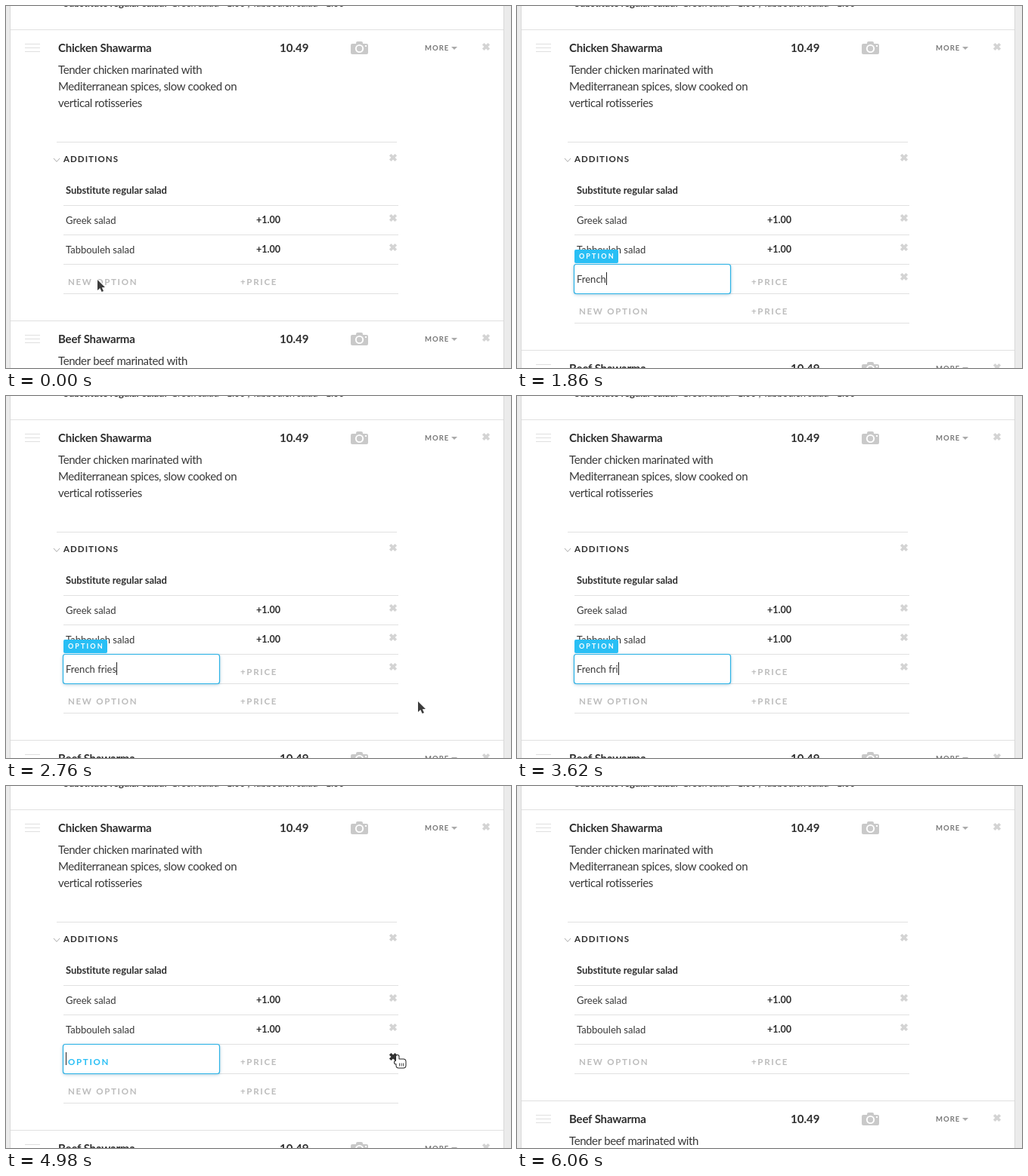
Write an HTML page with a canvas that moves like this. It is 668 px wide and 480 px high and loops after 6080 ms.

```html
<!DOCTYPE html>
<html lang="en">
<head>
<meta charset="utf-8">
<title>Menu editor</title>
<style>
  html, body { margin: 0; width: 100%; height: 100%; overflow: hidden; background: #ebebeb; }
  canvas { display: block; }
</style>
</head>
<body>
<canvas id="stage" width="668" height="480"></canvas>
<script>
const ctx = document.getElementById('stage').getContext('2d');
const LOOP = 6080, ROW = 39;
const INK = '#2e2e2e', SOFT_INK = '#383838', RULE = '#e1e1e1', PALE = '#d4d4d4', HINT = '#bcbcbc', BLUE = '#29bff5';
const WORD = 'French fries';
const ADDED = 520, TYPING = 940, CLEARED = 4440, BLURRED = 5100, REMOVED = 5320;

const progress = (t, a, b) => Math.min(1, Math.max(0, (t - a) / (b - a)));
const ease = p => p * p * (3 - 2 * p);
const mix = (a, b, p) => a + (b - a) * p;
const within = (t, a, b) => t >= a && t < b;

// Letters struck so far in an evenly paced run of key presses
function burst(t, first, last, steps, letters = steps) {
  if (t < first) return 0;
  const struck = 1 + Math.floor((steps - 1) * progress(t, first, last));
  return Math.round(letters * struck / steps);
}

function typedLetters(t) {
  const added = burst(t, TYPING, 1340, 4) + burst(t, 1680, 2240, 7) + burst(t, 2400, 2401, 1);
  const erased = burst(t, 3180, 3181, 1) + burst(t, 3560, 3820, 4, 5) + burst(t, 3960, CLEARED, 4, 6);
  return added - erased;
}

function text(str, x, y, size, { bold = false, gap = 0, color = bold ? INK : SOFT_INK } = {}) {
  ctx.font = `${bold ? 'bold ' : ''}${size}px Lato, sans-serif`;
  ctx.letterSpacing = gap + 'px';
  ctx.fillStyle = color;
  ctx.fillText(str, x, y);
  return ctx.measureText(str).width;
}

const hint = (str, x, y, color = HINT) => text(str, x, y, 11.5, { bold: true, gap: 1.7, color });

function rect(x, y, w, h, color) {
  ctx.fillStyle = color;
  ctx.fillRect(x, y, w, h);
}

const optionRule = y => rect(76, y, 443, 1, RULE);

function paint(fill, stroke, width) {
  ctx.lineJoin = 'round';
  if (stroke) { ctx.strokeStyle = stroke; ctx.lineWidth = width; ctx.stroke(); }
  if (fill) { ctx.fillStyle = fill; ctx.fill(); }
}

function shape(points, fill, stroke, width) {
  ctx.beginPath();
  points.forEach(([x, y]) => ctx.lineTo(x, y));
  ctx.closePath();
  paint(fill, stroke, width);
}

function box(x, y, w, h, r, fill) {
  ctx.beginPath();
  ctx.roundRect(x, y, w, h, r);
  paint(fill);
}

function disc(x, y, r, color) {
  ctx.beginPath();
  ctx.arc(x, y, r, 0, 7);
  paint(color);
}

function cross(x, y, color = PALE) {
  ctx.beginPath();
  for (const s of [-1, 1]) {
    ctx.moveTo(x - 3.8, y - 3.8 * s);
    ctx.lineTo(x + 3.8, y + 3.8 * s);
  }
  paint(null, color, 3.7);
}

function camera(x, y) {
  const gray = '#c9c9c9';
  box(x, y + 3, 23, 14, 2, gray);
  box(x + 7, y, 9, 6, 2, gray);
  disc(x + 11.5, y + 9.5, 5.6, '#fff');
  disc(x + 11.5, y + 9.5, 3.7, gray);
  rect(x + 19, y + 5, 2, 2, '#fff');
}

function dish(name, lines, y) {
  rect(6, y, 652, 1, RULE);
  for (let i = 0; i < 3; i++) rect(25, y + 19 + i * 5, 20, 1, '#dfdfdf');
  text(name, 69, y + 30, 15, { bold: true, gap: -.2 });
  text('10.49', 362, y + 30, 15, { bold: true });
  lines.forEach((line, i) => text(line, 69, y + 59 + i * 22, 15, { gap: -.4 }));
  camera(456, y + 16);
  text('MORE', 554, y + 28, 9.5, { bold: true, gap: 1, color: '#777' });
  shape([[589, y + 23], [597, y + 23], [593, y + 27]], '#aaa');
  cross(635, y + 23);
}

function option(name, y) {
  text(name, 79, y + 25, 13);
  text('+1.00', 331, y + 24, 12.5, { bold: true });
  cross(512, y + 17);
  optionRule(y + ROW);
}

function blankOption(y) {
  hint('NEW OPTION', 82, y + 28);
  hint('+PRICE', 310, y + 28);
  optionRule(y + ROW);
}

function field(t, typed) {
  const focus = ease(progress(t, 60, 280));
  if (!focus) return;
  ctx.globalAlpha = focus;
  ctx.save();
  ctx.shadowColor = 'rgba(40, 120, 160, .45)';
  ctx.shadowBlur = 4;
  ctx.shadowOffsetY = 1;
  box(75.5, 342.5, 207, 39, 3, '#fff');
  ctx.restore();
  paint(null, '#2bb2e6', 1.2);

  let caret = 79;
  if (typed) {
    caret += text(WORD.slice(0, typed), 79, 367, 13);
    const lift = ease(progress(t, TYPING - 20, TYPING + 60));
    const y = mix(344, 323, lift);
    ctx.globalAlpha = lift;
    box(76, y, 58, 18, 2, BLUE);
    text('OPTION', 82, y + 12, 9, { bold: true, gap: 2.1, color: '#fff' });
    ctx.globalAlpha = 1;
  } else {
    hint('OPTION', 82, 370, BLUE);
  }
  rect(Math.round(caret), 353, 1, 17, '#222');
  ctx.globalAlpha = 1;
}

function activeRow(t) {
  ctx.globalAlpha = 1 - progress(t, REMOVED, REMOVED + 240);
  hint('+PRICE', 310, 370);
  if (t < REMOVED) optionRule(381);
  if (t >= ADDED) cross(512, 359, within(t, 4900, REMOVED) ? '#333' : PALE);
  if (t >= BLURRED) {
    hint('OPTION', 82, 370);
  } else {
    hint('NEW OPTION', 82, 370);
    field(t, typedLetters(t));
  }
  ctx.globalAlpha = 1;
}

function arrow() {
  shape([[0, 0], [0, 14], [3.3, 11], [5.6, 16], [8, 15], [5.8, 10.2], [10, 10]], '#3c3c3c', '#fff', 2);
}

function beam() {
  for (const [color, width] of [['#fff', 3], ['#222', 1.2]]) {
    ctx.beginPath();
    for (const s of [-1, 1]) {
      ctx.moveTo(-3.5, 7.5 * s);
      ctx.quadraticCurveTo(0, 7.5 * s, 0, 5 * s);
      ctx.quadraticCurveTo(0, 7.5 * s, 3.5, 7.5 * s);
    }
    ctx.moveTo(0, -6);
    ctx.lineTo(0, 6);
    paint(null, color, width);
  }
}

function hand() {
  ctx.beginPath();
  ctx.roundRect(-2, 0, 3.5, 12, 1.7);
  ctx.roundRect(-1.5, 5.5, 12, 11, 3);
  ctx.roundRect(-4, 7.5, 6, 4, 2);
  paint('#fff', '#222', 2);
  for (let x = 2; x < 8; x += 2.5) rect(x, 10.5, 1, 4, '#444');
}

function pointer(t) {
  const typingHides = within(t, TYPING, 2400) || within(t, 3240, CLEARED + 40);
  if (typingHides || t >= 6060) return;
  let x = 121, y = 363;
  const glide = (start, end, toX, toY) => {
    const p = ease(progress(t, start, end));
    x = mix(x, toX, p);
    y = mix(y, toY, p);
  };
  glide(60, 380, 147, 361);
  glide(2400, 2740, 545, 405);
  glide(2840, 2940, 532, 403);
  glide(4480, 4960, 518, 357);
  glide(5920, 6060, 680, 428);

  ctx.save();
  ctx.translate(x, y);
  if (within(t, 100, CLEARED) && x < 283) beam();
  else if (within(t, 4900, REMOVED)) hand();
  else arrow();
  ctx.restore();
}

function draw(t) {
  const extra = t < ADDED ? 0 : ROW * (1 - ease(progress(t, REMOVED, REMOVED + 300)));

  rect(0, 0, 668, 480, '#ebebeb');
  rect(5, 0, 654, 480, '#d9d9d9');
  rect(6, 0, 652, 480, '#fff');

  text('Substitute regular salad:', 76, 1, 13, { bold: true, gap: -.1 });
  text('Greek salad +1.00 , Tabbouleh salad +1.00', 218, 1, 13, { gap: -.27 });
  dish('Chicken Shawarma', ['Tender chicken marinated with',
    'Mediterranean spices, slow cooked on', 'vertical rotisseries'], 31);

  rect(67, 180, 450, 1, RULE);
  ctx.beginPath();
  ctx.moveTo(63, 202);
  ctx.lineTo(67, 206.5);
  ctx.lineTo(71, 202);
  paint(null, '#aaa', 1);
  text('ADDITIONS', 76, 207, 11.5, { bold: true, gap: 1.05 });
  cross(512, 201);
  text('Substitute regular salad', 79, 249, 13, { bold: true, gap: -.08 });
  optionRule(264);
  ['Greek salad', 'Tabbouleh salad'].forEach((name, i) => option(name, 264 + i * ROW));

  if (t >= ADDED) blankOption(342 + extra);
  if (t < REMOVED + 240) activeRow(t);

  dish('Beef Shawarma', ['Tender beef marinated with'], 417 + extra);
  pointer(t);
}

function tick() {
  draw(performance.now() % LOOP);
  requestAnimationFrame(tick);
}
tick();
</script>
</body>
</html>
```
